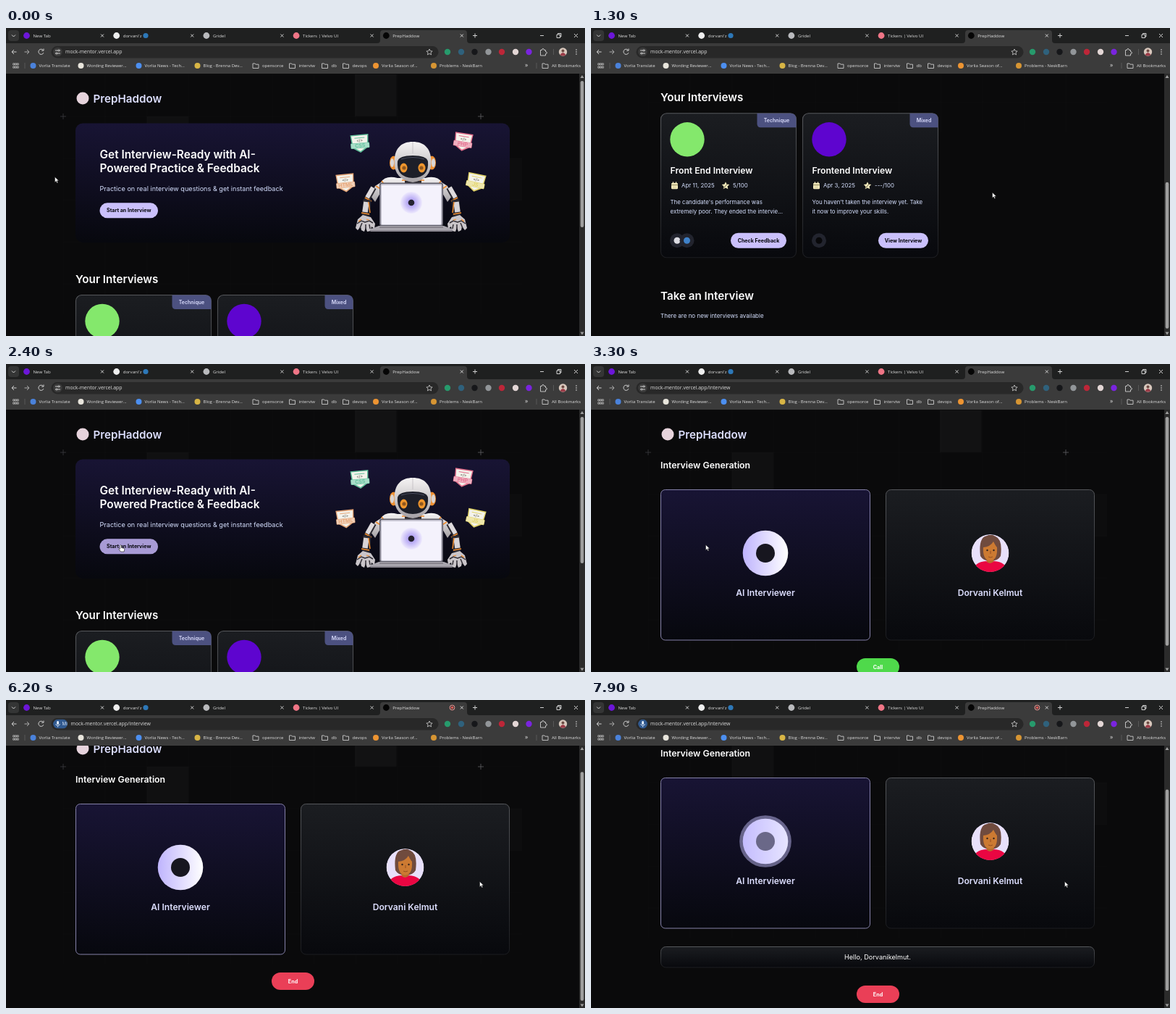
These frames come from a looping animation (800 by 425 pixels, 8 s). An HTML page:

```html
<!DOCTYPE html>
<html lang="en">
<head>
<meta charset="utf-8">
<title>Interview practice</title>
<style>
  html, body { margin: 0; height: 100%; overflow: hidden; background: #0a0a0b; }
  svg { display: block; width: 100vw; height: 100vh; }
  .page { font-family: Inter, sans-serif; }
  .chrome { font-family: "Open Sans", sans-serif; }
  text { white-space: pre; }
</style>
</head>
<body>
<svg id="stage" viewBox="0 0 800 425"></svg>
<script>
const DURATION = 8000, NAVIGATE = 3000, CONNECT = 3900, MIC_ON = 4700,
      ANSWERED = 5450, SPEAK = 6800, TRANSCRIPT = 7300;
const BRAND = 'PrepHaddow', PERSON = 'Dorvani Kelmut';

// ---- drawing helpers -------------------------------------------------
const text = (x, y, s, size, more = '') =>
  `<text x="${x}" y="${y + size * .36}" font-size="${size}" ${more}>${s}</text>`;
const rect = (x, y, w, h, r, fill, more = '') =>
  `<rect x="${x}" y="${y}" width="${w}" height="${h}" rx="${r}" fill="${fill}" ${more}/>`;
const disc = (x, y, r, fill, more = '') =>
  `<circle cx="${x}" cy="${y}" r="${r}" fill="${fill}" ${more}/>`;
const oval = (x, y, rx, ry, fill) => `<ellipse cx="${x}" cy="${y}" rx="${rx}" ry="${ry}" fill="${fill}"/>`;
const shape = (d, fill, more = '') => `<path d="${d}" fill="${fill}" ${more}/>`;
const line = (d, color = '#d0d0d0', w = 1, more = '') =>
  shape(d, 'none', `stroke="${color}" stroke-width="${w}" ${more}`);
const group = (s, more = '') => `<g ${more}>${s}</g>`;
const gradient = (id, a, b, dir = 'x2="0" y2="1"') =>
  `<linearGradient id="${id}" ${dir}><stop stop-color="${a}"/><stop offset="1" stop-color="${b}"/></linearGradient>`;
const MID = 'text-anchor="middle"', SEMI = 'font-weight="600"', BOLD = 'font-weight="700"';
const WHITE = 'fill="#fff"', SOFT = 'fill="#d6e0ff"', LILAC = 'fill="#dddfff"';

const defs = `<defs>
  ${gradient('night', '#181434', '#07080e')}
  ${gradient('panel', '#1b1d21', '#08090d')}
  ${gradient('edge', '#55575b', '#1b1c20')}
  ${gradient('glow', '#bfb4fd', '#fff', '')}
  ${gradient('shell', '#f6f4f4', '#a5a1a5')}
  <radialGradient id="halo"><stop offset=".35" stop-color="#b9abf5"/><stop offset="1" stop-color="#eeeafd"/></radialGradient>
  <pattern id="grid" x="79" y="64" width="57.7" height="57.7" patternUnits="userSpaceOnUse">
    ${line('M0 57.7V0H57.7', '#fff', .6, 'opacity=".03"')}</pattern>
  <clipPath id="face">${disc(551.5, 261, 26)}</clipPath>
  <clipPath id="chipClip"><rect id="chipBox" x="65" y="26.5" height="13" rx="6.5"/></clipPath>
</defs>`;

// ---- web page --------------------------------------------------------
const backdrop = rect(0, 0, 800, 700, 0, '#0a0a0b') + rect(79, 64, 634, 330, 0, 'url(#grid)') +
  [[482, 64, .03], [194.5, 122, .025], [655.5, 180, .012]].map(([x, y, a]) => rect(x, y, 57.7, 57.7, 0, '#fff', `opacity="${a}"`)).join('') +
  line('M75 122h8M79 118v8', '#3a3b3f', .8) + line('M652 122h8M656 118v8', '#606165', .8);
const brand = disc(106, 97, 8.5, '#e6d3dc') + text(120.5, 97.5, BRAND, 15.2, SEMI + LILAC);
const pill = (x, y, w, h, fill, label, more = '', id = '') =>
  rect(x, y, w, h, h / 2, fill, id) + text(x + w / 2, y + h / 2, label, 7.1, `${MID} ${BOLD} ${more}`);

const badge = (x, y, turn, color, label) => group(
  shape('M-12.5-12H12.5L11 6 0 13-11 6Z', color) + shape('M-11-10.500H11L9.500 5 0 11-9.500 5Z', '#f4f3ec') +
  line('M-7-7.500h14', color, 1) + text(0, -4, '&lt;/&gt;', 5, `${MID} ${BOLD} fill="#77756c"`) +
  rect(-13, -.5, 26, 7.5, 1, color) + rect(-12.5, 0, 25, 6.5, 1, '#fff', 'opacity=".45"') +
  text(0, 3, label, 7, `${MID} ${SEMI} fill="${color}"`),
  `transform="translate(${x} ${y}) rotate(${turn})"`);

const halfRobot =
  shape('M541 207Q524 203 518 213L510 218 504 232 510 240 521 221H560V207Z', 'url(#shell)') +
  line('M519 211l6 8M511 218l8 5', '#ef8a2b', 1.5) +
  line('M508 220L498 238', '#2c2a31', 8) + line('M507 220L499 234', '#dedadd', 6) + line('M496 234l9 5', '#ef8a2b', 1.5) +
  line('M499 237L497 259', '#2c2a31', 11) + line('M498 240L496 254', '#d8d4d7', 7.5) +
  line('M501 240l2 15M491 255l11 2', '#ef8a2b', 1.5) +
  shape('M493 258l-7 6-3 12 3 3 4-5 1 5 4 2 2-6 2 6 5-1 1-6 4 3 1-7-6-9Z', '#c9c5c9') +
  line('M485 270l6-4 5 2 6-2 5 3M489 276l3-7m5 9v-7m6 6l-1-6', '#302d34', 1.5) + line('M487 267l4-3m7 0l4 1', '#ef8a2b', 1.2);
const robot = halfRobot + group(halfRobot, 'transform="translate(1120 0) scale(-1 1)"') +
  rect(551, 203, 23, 13, 3, '#29272d') + line('M547 210h31', '#ef8a2b', 1.5) +
  [[535.5, 533.5], [588.5, 590.5]].map(([x, inner]) => oval(x, 186, 5.5, 9.5, '#ee8f31') + oval(inner, 186, 2.6, 6, '#d9d5d4')).join('') +
  shape('M536.500 184C537 165 547 157 562 157S587 165 587.500 184Q588 209 562 213 536 209 536.500 184Z', 'url(#shell)') +
  line('M562 157v16', '#bfbbc0', .8) +
  shape('M541 184Q543 176 562 176T583 184Q585 206 562 207 539 206 541 184Z', '#1d1f29') +
  line('M546 181q16-5 32 0', '#4b4e60', 1.2) +
  oval(549.5, 193, 5, 6.5, '#ef962d') + oval(574.5, 193, 5, 6.5, '#ef962d') +
  disc(550, 193, 2.6, '#8f581f') + disc(574, 193, 2.6, '#8f581f') +
  rect(516, 213.5, 88, 60, 3, '#5c5b67') + rect(517.5, 215, 85, 57, 2, '#c5c3d0') + rect(519, 217, 82, 54, 1, '#f4f2fc') +
  disc(560, 241, 15, 'url(#halo)') + disc(560, 241, 4.3, '#252331') +
  shape('M515 273H605L618 278 616 281H504L502 278Z', '#a9a6ae') + line('M516 275H604M503 280H617', '#66636c', 1);

const hero = rect(96, 131.5, 600, 164.5, 10, 'url(#night)') +
  group(text(129.5, 174, 'Get Interview-Ready with AI-', 15.4) +
        text(129.5, 193, 'Powered Practice &amp; Feedback', 15.4), SEMI + WHITE) +
  text(129.5, 222, 'Practice on real interview questions &amp; get instant feedback', 9.15, SOFT) +
  pill(129.5, 241.3, 80.5, 21, '#cac0fb', 'Start an Interview', 'fill="#05060c"', 'id="start"') +
  badge(489, 159, -5, '#62c19c', 'CSS') + badge(631.5, 157, 9, '#e2708d', 'PHP') +
  badge(469, 213.5, -6, '#e5a678', 'HTML') + badge(649, 213, 12, '#e0d267', 'JS') + robot;

const calendar = rect(111, 464.5, 9, 8.5, 1.5, '#f5ecbd') + line('M111 467.3h9', '#6b633c', .8) +
  line('M113.4 463v2m4.2-2v2', '#f5ecbd', 1.1) + line('M113 469.5h5m-5 1.8h5', '#a59c6d', .7, 'stroke-dasharray="1 .9"');
const star = shape('M186 463l1.6 3.3 3.7.4-2.7 2.6.7 3.7-3.3-1.8-3.3 1.8.7-3.7-2.7-2.6 3.7-.4Z', '#f5ecbd') +
  line('M183 472l6-7', '#3a3727', .8);
const card = (dx, tag, tagW, logo, title, date, score, lines, action, actionW, icons) => group(
  rect(96.5, 368.5, 187, 199, 8, 'url(#panel)', 'stroke="url(#edge)" stroke-width="1.1"') +
  shape(`M${283.5 - tagW} 368.5h${tagW - 8}q8 0 8 8v11.5h${5 - tagW}q-5 0-5-5Z`, '#4c5180') +
  text(283.5 - tagW / 2, 378.5, tag, 7, MID + ' ' + SEMI + LILAC) + disc(133, 404.5, 23.7, logo) +
  text(109.5, 447, title, 12.2, SEMI + WHITE) + calendar + star +
  group(text(125, 468, date, 7.9) + text(196, 468, score, 7.9) +
        lines.map((s, i) => text(109.5, 491 + i * 12.6, s, 7.9)).join(''), SOFT) +
  icons.map((c, i) => disc(119 + i * 13.5, 544, 10, '#22242e') + disc(119 + i * 13.5, 544, 4.5, c)).join('') +
  pill(270 - actionW, 533.5, actionW, 21, '#cac0fb', action, 'fill="#05060c"'), `transform="translate(${dx})"`);

const home = brand + hero +
  text(96, 346.5, 'Your Interviews', 15.2, SEMI + WHITE) +
  card(0, 'Technique', 54, '#84e86c', 'Front End Interview', 'Apr 11, 2025', '5/100',
    ["The candidate's performance was", 'extremely poor. They ended the intervie...'], 'Check Feedback', 77, ['#dcdce2', '#3f82c9']) +
  card(196, 'Mixed', 39, '#5e05cf', 'Frontend Interview', 'Apr 3, 2025', '---/100',
    ["You haven't taken the interview yet. Take", 'it now to improve your skills.'], 'View Interview', 69, ['#08080a']) +
  text(96, 620, 'Take an Interview', 15.2, SEMI + WHITE) +
  text(96, 648, 'There are no new interviews available', 8, SOFT);

const portrait = group(disc(551.5, 261, 26, '#e8e0fb') +
  shape('M538 265Q535 239 547 237 553 234 559 238 569 242 566 265 562 272 552 272T538 265Z', '#704b3e') +
  rect(546.5, 265, 10, 13, 4, '#b96a2c') +
  shape('M526 290Q528 273 546 272q5 6 11 0 18 1 20 18Z', '#ea0642') +
  shape('M542 253Q552 252 556 245 559 251 561 253 562 271 551.500 271.500 541 271 542 253Z', '#cc7a32') +
  disc(547.5, 257, 1.2, '#33221c') + disc(556.5, 257, 1.2, '#33221c') +
  line('M549 266q3 2 6 0M552 258v4', '#8f4a20', .9), 'clip-path="url(#face)"');
const call = brand + text(96, 140, 'Interview Generation', 12.3, SEMI + WHITE) +
  rect(96.5, 173.5, 289, 207.5, 6, 'url(#night)', 'stroke="#8480a8"') +
  rect(407.5, 173.5, 288, 207.5, 7, 'url(#panel)', 'stroke="url(#edge)"') +
  disc(241, 261, 31.3, 'url(#glow)') + disc(241, 261, 13, '#17161f') + disc(241, 261, 26, '#cac5fe', 'id="ping"') +
  portrait + group(text(241, 316, 'AI Interviewer', 12.1) + text(551.5, 316, PERSON, 12.1), MID + ' ' + SEMI + LILAC) +
  group(rect(96.5, 406.5, 599, 28.5, 7, 'url(#panel)', 'stroke="url(#edge)"') +
    text(396, 421, `Hello, ${PERSON[0] + PERSON.slice(1).toLowerCase().replace(' ', '')}.`, 9.15, MID + ' ' + WHITE), 'id="transcript"') +
  group(pill(367, 406, 59, 24, '#4fd94b', '', '', 'id="callButton"') +
    text(396.5, 418, '', 7.2, `id="callLabel" ${MID} ${BOLD} ${WHITE}`), 'id="callAction"');

// ---- browser frame ---------------------------------------------------
const cross = (x, y, r) => line(`M${x - r} ${y - r}l${2 * r} ${2 * r}m0 ${-2 * r}l${-2 * r} ${2 * r}`);
const folder = (x, label) =>
  line(`M${x - 4} 49h3l1 1.2h4v5.3h-8Z`, '#c9c9c9', .9) + text(x + 9, 52, label, 6);
const tabs = [['New Tab', '#6c16d8'], ["dorvani'z", '#eee'], ['Gridel', '#b9babd'], ['Tickers | Velvo UI', '#ef7586'], [BRAND, '#050505']];
const bookmarks = [[37.5, '#4a82db', 'Vorlia Translate'], [103.5, '#e8e5dc', 'Wording Reviewer...'], [183.5, '#4c8ff0', 'Vorlia News - Tech...'],
  [264.5, '#d8b545', 'Blog - Brenna Dev...'], [511, '#ed9432', 'Vorlia Season of...'], [591, '#d69533', 'Problems - NeskBarn']];
const extensions = [[610, '#279a6c'], [629, '#2f617c'], [647.5, '#16171a'], [666.5, '#929699'], [685, '#bd2638'], [704, '#e3d6d5'], [722.5, '#7a24df']];
const chrome = rect(0, 0, 800, 24, 0, '#1f2020') + rect(0, 21, 800, 42, 0, '#3b3b3b') +
  shape('M513 21q4 0 4-4V7q0-4 4-4H633q4 0 4 4V17q0 4 4 4Z', '#3b3b3b') +
  rect(3, 3, 15, 15, 4, '#343535') + line('M8 9.5l2.5 2.5 2.5-2.5') +
  tabs.map(([s, c], i) => disc(28.5 + i * 124.2, 10.5, 4.4, c) + text(37.5 + i * 124.2, 10.5, s, 6.1) + cross(133 + i * 124.2, 10.5, 2)).join('') +
  disc(193, 10.5, 3.6, '#2d78b8') +
  group(disc(616.5, 10.5, 3.4, 'none', 'stroke="#ed9a96"') + disc(616.5, 10.5, 1.7, '#e65a55'), 'id="recording"') +
  line('M645 10.5h6m-3-3v6M738 10.5h5M761 9h4.5v4.5H761Zm1.5 0V7.5H767V12h-1.5') + cross(787.5, 10.5, 2.5) +
  line('M14.5 33H8m3-3l-3 3 3 3') + line('M25.5 33H32m-3-3l3 3-3 3', '#aaa') +
  line('M51.3 30.5a3.6 3.6 0 1 0 .6 3.6M52 28.5v2.7h-2.8') +
  rect(62.5, 25, 535, 16.5, 8.2, '#282828') +
  group(disc(71.5, 33, 6.3, '#3b3b3b') + line('M68 31h4m2 0h1M68 35h1m2 0h4', '#ddd', .9) +
    disc(73, 31, 1.1, 'none', 'stroke="#ddd" stroke-width=".8"') + disc(70, 35, 1.1, 'none', 'stroke="#ddd" stroke-width=".8"'), 'id="siteInfo"') +
  group(rect(65, 26.5, 90, 13, 6.5, '#30598f') + rect(70.2, 29, 2.8, 5, 1.4, '#e6f0ff') +
    line('M68.8 33q0 2.4 2.8 2.4t2.8-2.4M71.6 35.4v2', '#e6f0ff', .8) + text(77.5, 33, 'Microphone in use', 6.3, 'fill="#e6f0ff"'),
    'id="chip" clip-path="url(#chipClip)"') +
  text(82, 33, '', 6.9, 'id="address"') +
  line('M585 29l1.2 2.7 2.9.3-2.2 2 .7 2.9-2.6-1.5-2.6 1.5.7-2.9-2.2-2 2.9-.3Z', '#d0d0d0', .8) +
  extensions.map(([x, c]) => disc(x, 33, 4.2, c)).join('') +
  line('M738.5 30.5h2q0-2 1.5-2t1.5 2h2v2.3q2 0 2 1.4t-2 1.4V38h-7Z', '#d0d0d0', .9) +
  line('M756.5 29v8M26 48v8M733 48v8', '#606060', .8) +
  disc(769.5, 33, 5.7, '#d8c8bd') + disc(769.5, 31.5, 2, '#6d4b43') + shape('M765.5 37q4-6 8 0-4 3-8 0Z', '#9c3c48') +
  [30, 33, 36].map(y => disc(788, y, .8, '#ddd')).join('') +
  [0, 1, 2, 3, 4, 5].map(i => line(`M${9.7 + i % 3 * 2.8} ${i < 3 ? 48.8 : 53}h2v2.2h-2Z`, '#ccc', .7)).join('') +
  bookmarks.map(([x, c, s]) => disc(x, 52, 4, c) + text(x + 8, 52, s, 6)).join('') +
  folder(345, 'opensorce') + folder(395.5, 'interviw') + folder(440.5, 'db') + folder(469.5, 'devops') + folder(745, 'All Bookmarks') +
  text(717, 51, '»', 8.5) +
  rect(792, 63, 8, 362, 0, '#2b2b2b') + shape('M793.5 69l2.5-4 2.5 4ZM793.5 419.500l2.5 4 2.5-4Z', '#9f9f9f') +
  rect(793.7, 73, 4.6, 200, 2.3, '#9f9f9f', 'id="thumb"');

const pointers = group(shape('M0 0v7.4l1.8-1.6 1.2 2.8 1.3-.6-1.2-2.7h2.4Z', '#fff', 'stroke="#111" stroke-width=".5"'), 'id="arrow"') +
  group(shape('M-1 1q1-1.500 2 0v3l3.500.8q1 .3.8 1.500l-.7 3.200H0L-2.700 6q.2-1.200 1.700-.2Z', '#fff', 'stroke="#111" stroke-width=".6"'), 'id="hand"');

document.getElementById('stage').innerHTML = defs +
  group(backdrop + group(home, 'id="home"') + group(call, 'id="call"'), 'id="page" class="page"') +
  group(chrome, 'class="chrome" fill="#dedede"') + group(pointers, 'id="pointer"');

// ---- motion ----------------------------------------------------------
const el = Object.fromEntries([...document.querySelectorAll('[id]')].map(e => [e.id, e]));
const set = (name, attrs) => { for (const k in attrs) el[name].setAttribute(k, attrs[k]); };
const show = (name, on) => set(name, { visibility: on ? 'visible' : 'hidden' });
const clamp = p => Math.min(1, Math.max(0, p));
const ease = p => p * p * (3 - 2 * p);

// Keys are [time, value, ...]; values ease from one key to the next.
function track(t, keys) {
  let i = keys.findIndex(k => k[0] > t);
  if (i < 0) i = keys.length - 1;
  const b = keys[i], a = keys[Math.max(0, i - 1)];
  const p = ease(clamp((t - a[0]) / (b[0] - a[0] || 1)));
  return b.slice(1).map((v, j) => a[j + 1] + (v - a[j + 1]) * p);
}
const cursorKeys = [[150, 67.5, 205.5], [800, 554.5, 227], [1850, 554.5, 227], [2300, 158.5, 249.5],
  [3350, 158.5, 249.5], [3800, 400.5, 384], [5500, 400.5, 384], [6000, 654.5, 250.5]];
const scrollKeys = [[740, 0], [1320, 251.5], [1610, 251.5], [1810, 0], [3300, 0], [3550, 30], [7400, 30], [7700, 66]];
const chipKeys = [[MIC_ON, 0], [4950, 1], [6000, 1], [6250, 0]];

// cubic-bezier(0, 0, .2, 1)
function pingEase(x) {
  let lo = 0, hi = 1;
  for (let i = 0; i < 16; i++) {
    const s = (lo + hi) / 2;
    if (.6 * s * s + .4 * s ** 3 < x) lo = s; else hi = s;
  }
  return ease(lo);
}

function render(t) {
  const inCall = t >= NAVIGATE, mic = t >= MIC_ON, answered = t >= ANSWERED, spoken = t >= TRANSCRIPT;
  const [scroll] = track(t, scrollKeys), [x, y] = track(t, cursorKeys), [open] = track(t, chipKeys);
  show('home', !inCall);
  show('call', inCall);
  set('page', { transform: `translate(0 ${-scroll})` });
  const perPixel = 342 / (!inCall ? 613 : spoken ? 446 : 392);
  set('thumb', { y: 73 + scroll * perPixel, height: 362 * perPixel });

  const overStart = t > 2240 && !inCall, overCall = t > 3720 && t < 5560;
  set('start', { fill: overStart ? '#a89bd5' : '#cac0fb' });
  set('pointer', { transform: `translate(${x} ${y})` });
  show('arrow', !overStart && !overCall);
  show('hand', overStart || overCall);

  set('callButton', { fill: answered ? '#ea3f57' : '#4fd94b' });
  el.callLabel.textContent = answered ? 'End' : t >= CONNECT ? '...' : 'Call';
  set('callAction', { transform: `translate(0 ${spoken ? 54 : 0})` });
  set('transcript', { opacity: clamp((t - TRANSCRIPT) / 300) });
  const p = t < SPEAK ? 1 : pingEase(clamp((t - SPEAK) % 1000 / 750));
  set('ping', { r: 26 * (1 + p), opacity: .75 * (1 - p) });

  show('recording', mic);
  show('chip', mic);
  show('siteInfo', !mic);
  set('chipBox', { width: 13 + 70 * open });
  set('address', { x: 82 + 75 * open });
  el.address.textContent = 'mock-mentor.vercel.app' + (inCall ? '/interview' : '');
}

const start = performance.now();
function frame() {
  render((performance.now() - start) % DURATION);
  requestAnimationFrame(frame);
}
frame();
</script>
</body>
</html>
```
